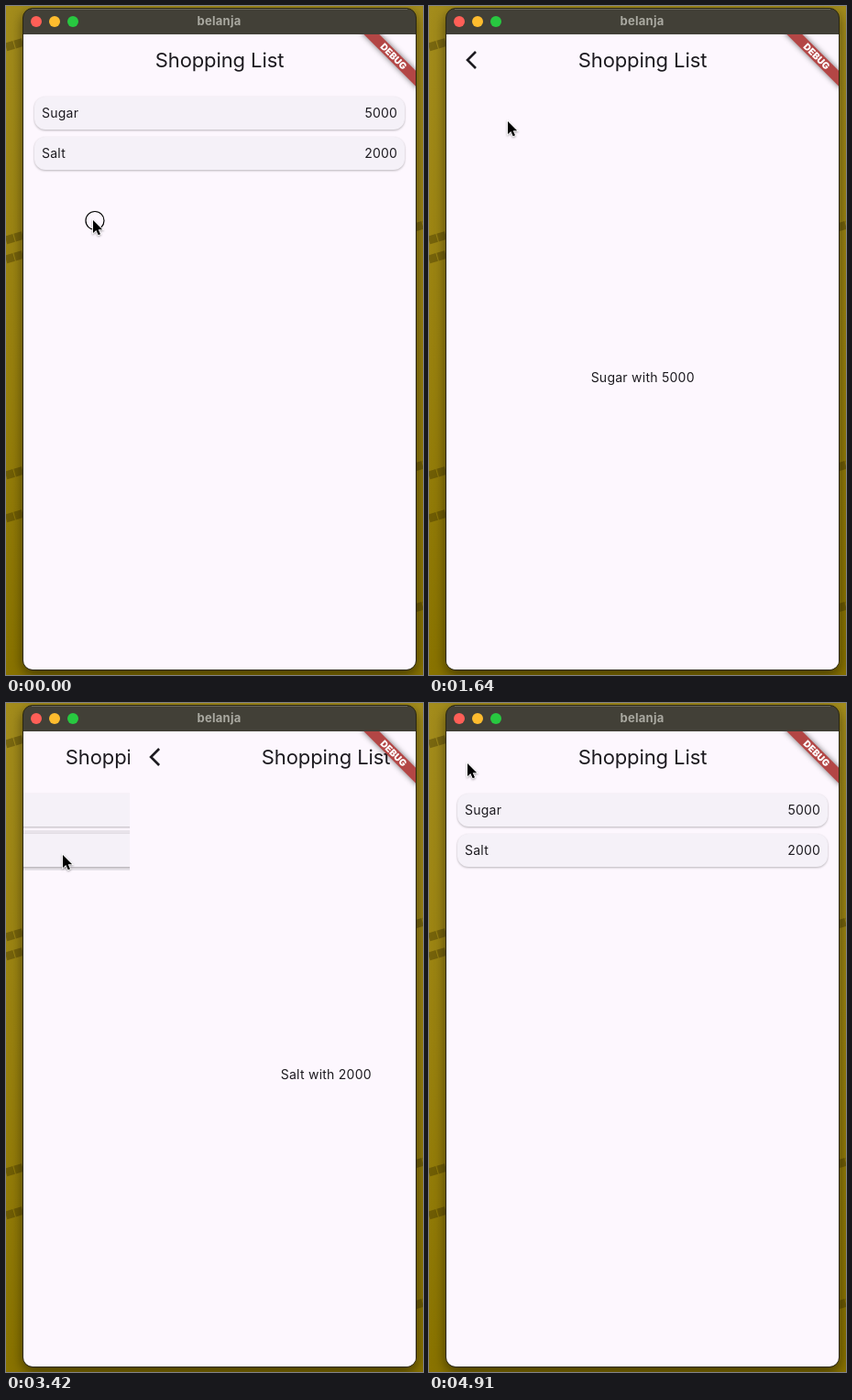
Write an HTML page that moves like this. It is 455x731 px and loops after 4930 ms.

```html
<!DOCTYPE html>
<html lang="en">
<head>
<meta charset="utf-8">
<title>Shopping list</title>
<style>
  html, body { margin: 0; width: 100%; height: 100%; overflow: hidden; background: #8b7509; }
  svg { display: block; width: 455px; height: 731px; }
  text { font: 14px Inter, sans-serif; letter-spacing: .25px; fill: #1d1b20; white-space: pre; }
  .title { font-size: 22px; letter-spacing: -.1px; text-anchor: middle; }
  .mid { text-anchor: middle; }
  .end { text-anchor: end; }
  .card { fill: #f5f1f8; filter: drop-shadow(0 1px 1px rgba(0, 0, 0, .27)); }
  .window { filter: drop-shadow(0 5px 7px rgba(0, 0, 0, .5)); }
  .ribbon { fill: #b34645; filter: drop-shadow(0 0 3px rgba(0, 0, 0, .55)); }
  .pointer { filter: drop-shadow(0 1px 1px rgba(0, 0, 0, .35)); }
</style>
</head>
<body>
<svg viewBox="0 0 455 731">
  <defs>
    <linearGradient id="wall" x2="0" y2="1">
      <stop stop-color="#a38c1c"/>
      <stop offset=".5" stop-color="#9a820f"/>
      <stop offset="1" stop-color="#897300"/>
    </linearGradient>
    <clipPath id="content"><path d="M19 31H447V715a10 10 0 0 1-10 10H29a10 10 0 0 1-10-10z"/></clipPath>
  </defs>

  <rect width="455" height="731" fill="url(#wall)"/>
  <path d="M0 45l20-6M0 256l20-6M0 277l20-6M0 513l20-6M0 560l20-6M446 242l10-3M446 504l10-3M446 658l10-3"
        stroke="#3e3000" stroke-opacity=".4" stroke-width="9" stroke-dasharray="9 1"/>

  <g class="window">
    <rect x="18.5" y="2.5" width="429" height="723" rx="10.5" fill="#424037" stroke="#2b270f"/>
  </g>
  <path d="M28 3.5H438" stroke="#68665c"/>
  <circle cx="33" cy="17" r="6" fill="#ff5f57"/>
  <circle cx="53" cy="17" r="6" fill="#febc2e"/>
  <circle cx="73" cy="17" r="6" fill="#28c840"/>
  <text class="mid" x="232.5" y="21" style="font-size:13px;font-weight:700;fill:#aaa9a1">belanja</text>

  <g clip-path="url(#content)">
    <rect x="19" y="31" width="428" height="694" fill="#fdf7fe"/>
    <g id="list">
      <text class="title" x="233" y="67">Shopping List</text>
      <rect id="highlight" x="27" width="412" height="44" fill="#1d1b20"/>
      <rect class="card" x="31" y="99" width="404" height="36" rx="12"/>
      <text x="39" y="122">Sugar</text>
      <text class="end" x="427.2" y="122">5000</text>
      <rect class="card" x="31" y="143" width="404" height="36" rx="12"/>
      <text x="39" y="166">Salt</text>
      <text class="end" x="427.2" y="166">2000</text>
    </g>
    <g id="detail">
      <rect x="19" y="31" width="428" height="694" fill="#fdf7fe"/>
      <circle id="halo" cx="47" cy="59" r="28" fill="#1d1b20"/>
      <path d="M51 50l-9 9 9 9" fill="none" stroke="#1d1b20" stroke-width="2.6"/>
      <text class="title" x="233" y="67">Shopping List</text>
      <text id="message" class="mid" x="233.2" y="411"></text>
    </g>
    <g id="tooltip">
      <rect x="29" y="83" width="45" height="25" rx="4" fill="#868586"/>
      <text class="mid" x="51.6" y="100" style="font-size:12px;fill:#fff">Back</text>
    </g>
    <g transform="translate(447 31) rotate(45)">
      <rect class="ribbon" x="-44" y="28" width="88" height="12"/>
      <text class="mid" y="37.7" style="font-size:10.2px;font-weight:900;letter-spacing:0;fill:#fff">DEBUG</text>
    </g>
  </g>

  <g id="cursor">
    <circle id="ring" cx="2" cy=".5" r="10" fill="none" stroke="#000" stroke-width="1.2"/>
    <path id="arrow" class="pointer" d="M0 0V14L3.3 11 5.7 16.2 8 15.2 5.7 10.2H10.2z"
          stroke="#fff" stroke-width="1.6" paint-order="stroke"/>
    <path id="hand" class="pointer" fill="#fff" stroke="#000"
          d="M-1.5 10V1.5a1.5 1.5 0 0 1 3 0V6q2-1 2.7.4 2-.8 2.6.6 1.9-.5 2 1.2v3.3q0 2-1.5 4v1.5H0q-.5-2-2.3-4L-5 9.6q.6-2 3.5.4z"/>
  </g>
</svg>

<script>
const LOOP = 4930, STEP = 148.8, SLIDE = 300;
const el = Object.fromEntries([...document.querySelectorAll('[id]')].map(e => [e.id, e]));

// Cursor poses: step, x, y, flags (h = hand, r = click ring, b = on back button, t = tooltip)
const poses = [
  [0, 95, 234, 'r'], [1, 95, 234, ''], [4, 94, 214, ''], [5, 92, 176, 'h'], [6, 90, 142, 'h'],
  [7, 86, 126, 'hr'], [8, 86, 126, ''], [12, 60, 84, ''], [13, 40, 57, 'hbt'], [16, 40, 57, 'hrbt'],
  [17, 43, 76, ''], [18, 52, 109, 'h'], [19, 56, 126, 'h'], [20, 59, 146, 'h'], [21, 61, 160, 'h'],
  [22, 62, 166, 'hr'], [23, 62, 166, ''], [26, 56, 130, ''], [27, 46, 90, ''], [28, 42, 66, 'hbt'],
  [30, 42, 66, 'rb'], [31, 42, 66, '']
];
const visits = [
  { push: 1090, pop: 2438, text: 'Sugar with 5000' },
  { push: 3338, pop: 4530, text: 'Salt with 2000' }
];

const clamp = v => Math.min(1, Math.max(0, v));
const mix = (s, a, b, c, d) =>
  a * (1 - s) ** 3 + 3 * b * s * (1 - s) ** 2 + 3 * c * s * s * (1 - s) + d * s ** 3;

// y of a cubic Bezier at the given x
function bezier(x, xs, ys) {
  let low = 0, high = 1;
  for (let i = 0; i < 24; i++) {
    const s = (low + high) / 2;
    if (mix(s, ...xs) < x) low = s; else high = s;
  }
  return mix(low, ...ys);
}
const slideCurve = t => t < .198
  ? bezier(t, [0, .056, .108, .198], [0, .024, .3085, .541])
  : bezier(t, [.198, .3655, .5465, 1], [.541, 1, .989, 1]);
const parallaxCurve = t => bezier(t, [0, .35, .33, 1], [0, .91, .97, 1]);

const show = (e, on) => e.setAttribute('visibility', on ? 'visible' : 'hidden');
const move = (e, x, y = 0) => e.setAttribute('transform', `translate(${x} ${y})`);

function draw(time) {
  const step = Math.floor((time + 7) / STEP), now = step * STEP;
  const [, x, y, flags] = poses.findLast(p => p[0] <= step);
  const has = flag => flags.includes(flag);

  const visit = visits.findLast(v => now >= v.push) || visits[0];
  const pushed = clamp((now - visit.push) / SLIDE), popped = clamp((now - visit.pop) / SLIDE);
  const open = curve => popped > 0 ? 1 - curve(popped) : pushed > 0 ? curve(pushed) : 0;
  const page = open(slideCurve);
  move(el.list, -428 / 3 * open(parallaxCurve));
  move(el.detail, 428 * (1 - page));
  show(el.detail, page > .001);
  el.message.textContent = visit.text;

  const row = Math.floor((y - 95) / 44);
  const pushing = pushed > 0 && pushed < 1;
  const tint = has('r') || pushing ? .09 : has('h') ? .045 : 0;
  el.highlight.setAttribute('y', 95 + 44 * row);
  el.highlight.setAttribute('opacity', row === 0 || row === 1 ? tint : 0);

  const leaving = popped > 0 && popped < 1;
  el.halo.setAttribute('opacity', has('b') ? (has('t') ? .09 : .11) : leaving ? .1 * page : 0);
  show(el.tooltip, has('t'));

  move(el.cursor, x, y);
  show(el.ring, has('r'));
  show(el.hand, has('h'));
  show(el.arrow, !has('h'));
}

function frame() {
  draw(performance.now() % LOOP);
  requestAnimationFrame(frame);
}
frame();
</script>
</body>
</html>
```
